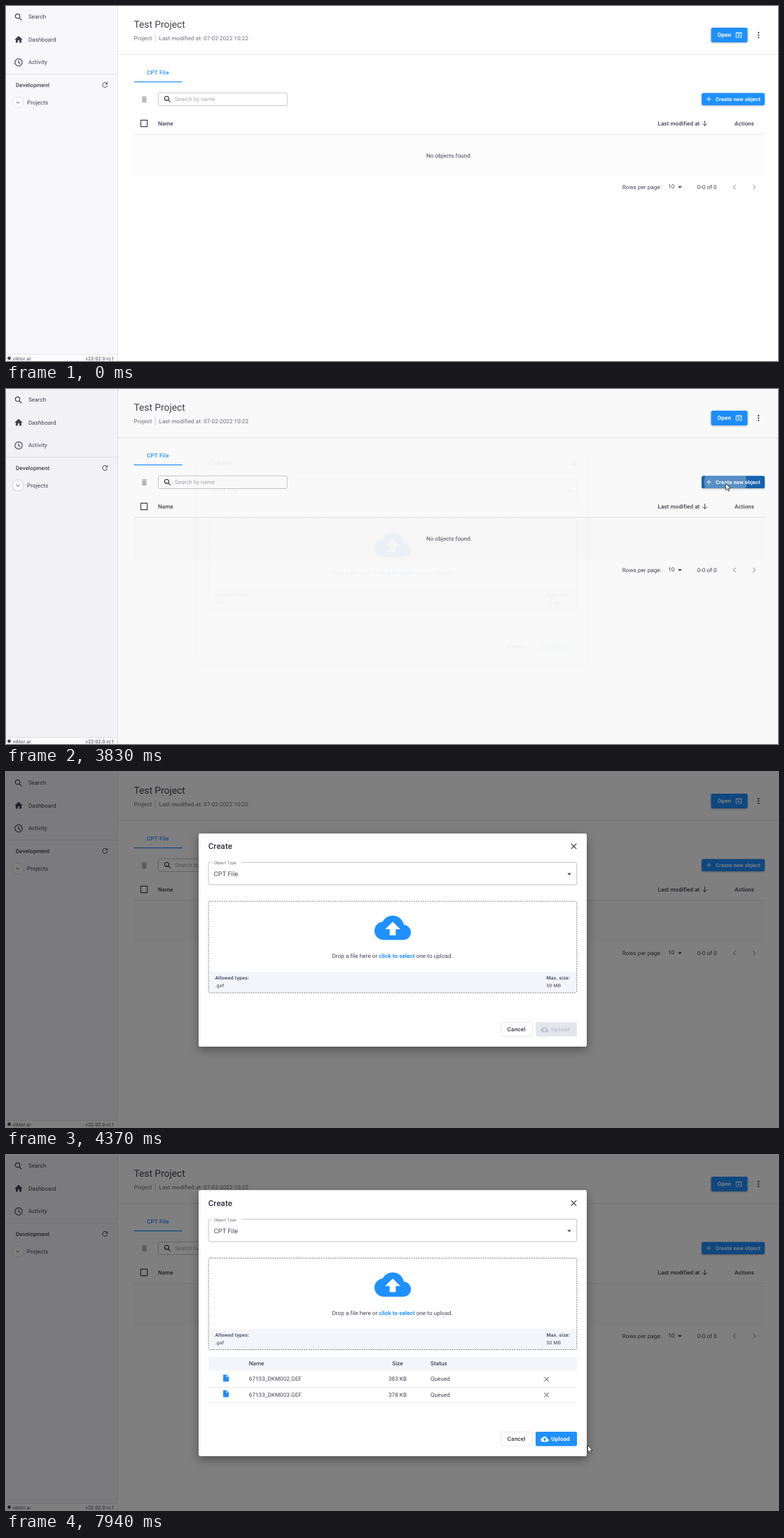
An HTML page that plays this animation: 1102x508 px, repeating every 8 s.

```html
<!DOCTYPE html>
<html lang="en">
<head>
<meta charset="utf-8">
<title>Create object</title>
<style>
html, body { margin: 0; width: 100%; height: 100%; overflow: hidden; background: #fff; }
svg { display: block; width: 100vw; height: 100vh; }
text { font-family: Roboto, Arial, sans-serif; text-rendering: geometricPrecision; white-space: pre; }
#paper { filter: drop-shadow(0 5px 7px rgba(0, 0, 0, .35)); }
.raised { filter: drop-shadow(0 1px 1px rgba(0, 0, 0, .3)); }
</style>
</head>
<body>
<svg id="stage" viewBox="0 0 1102 508"></svg>
<script>
const INK = '#414150', BLUE = '#1e90ff', LINE = '#e0e0e4', PALE = '#f4f5fb';

// ---- drawing helpers ----
const text = (x, y, str, o = {}) => {
  const { size = 8.04, weight = 400, fill = INK, gap = .0107, anchor = 'start', extra = '' } = o;
  return `<text x="${x}" y="${y}" font-size="${size}" font-weight="${weight}" fill="${fill}"
    letter-spacing="${gap * size}" text-anchor="${anchor}" ${extra}>${str}</text>`;
};
const strong = (x, y, str, o) => text(x, y, str, { weight: 500, ...o });
const small = (x, y, str, o) => text(x, y, str, { size: 6.89, gap: .0333, ...o });
const rect = (x, y, w, h, fill, extra = '') =>
  `<rect x="${x}" y="${y}" width="${w}" height="${h}" fill="${fill}" ${extra}/>`;
const box = (x, y, w, h, stroke, extra = '') =>
  rect(x, y, w, h, 'none', `rx="2.3" stroke="${stroke}" stroke-width=".8" ${extra}`);

const solid = {
  home: 'M10 20v-6h4v6h5v-8h3L12 3 2 12h3v8z',
  trash: 'M6 19c0 1.1.9 2 2 2h8c1.1 0 2-.9 2-2V7H6zM19 4h-3.5l-1-1h-5l-1 1H5v2h14z',
  drop: 'M7 10l5 5 5-5z',
  cloud: 'M19.35 10.04C18.67 6.59 15.64 4 12 4 9.11 4 6.6 5.64 5.35 8.04 2.34 8.36 0 10.91 0 14c0 3.31 2.69 6 6 6h13c2.76 0 5-2.24 5-5 0-2.64-2.05-4.78-4.65-4.96zM14 13v4h-4v-4H7l5-5 5 5z',
  file: 'M6 2c-1.1 0-2 .9-2 2v16c0 1.1.9 2 2 2h12c1.1 0 2-.9 2-2V8l-6-6zm7 7V3.5L18.5 9z',
  dots: 'M10 6a2 2 0 1 0 4 0 2 2 0 1 0-4 0M10 12a2 2 0 1 0 4 0 2 2 0 1 0-4 0M10 18a2 2 0 1 0 4 0 2 2 0 1 0-4 0'
};
const lines = {
  search: 'M4 9.5a5.5 5.5 0 1 0 11 0 5.5 5.5 0 1 0-11 0M13.7 13.7l6 6',
  clock: 'M3 12a9 9 0 1 0 18 0 9 9 0 1 0-18 0M12 7v5.4l4 2.4',
  refresh: 'M18 7.5A7.3 7.3 0 1 0 19.2 13.5M19 4v5.5h-5.5',
  right: 'M9 6l6 6-6 6',
  left: 'M15 6l-6 6 6 6',
  expand: 'M6.5 9.5l5.5 5.5 5.5-5.5',
  down: 'M12 4v15M5 12.5l7 7 7-7',
  close: 'M5.5 5.5l13 13M18.5 5.5l-13 13',
  plus: 'M12 5v14M5 12h14',
  check: 'M4 4h16v16H4z',
  open: 'M9 19.5H4V5h16v14.5h-5M4 6.5h16M12 20v-9M8.5 14l3.5-3.5 3.5 3.5'
};
const icon = (name, cx, cy, size = 13.8, color = INK) => {
  const paint = solid[name] ? `fill="${color}"` : `fill="none" stroke="${color}" stroke-width="2"`;
  const k = size / 24;
  return `<path transform="translate(${cx - size / 2} ${cy - size / 2}) scale(${k})" d="${solid[name] || lines[name]}" ${paint}/>`;
};

// ---- page ----
const white = { weight: 700, fill: '#fff', gap: .0286 };
const sidebar = rect(0, 0, 159.5, 508, '#f7f7fc') + rect(0, 498, 159.5, 10, '#fff') +
  rect(159, 0, .8, 508, LINE) + rect(0, 97, 159, .8, LINE) + rect(0, 498, 159, .8, LINE) +
  icon('search', 18, 16) + text(32, 18.4, 'Search') +
  icon('home', 18, 48) + text(32, 50.9, 'Dashboard') +
  icon('clock', 18, 80.8) + text(32, 83.3, 'Activity') +
  strong(14, 115.7, 'Development') + icon('refresh', 141.3, 113, 11.5) +
  '<circle cx="17" cy="138" r="8" fill="#fff" stroke="#d0d0d8" stroke-width=".7"/>' +
  icon('expand', 17, 138, 10.5) + text(30, 140.6, 'Projects') +
  '<circle cx="4.5" cy="504" r="2.4" fill="#41414f"/>' +
  small(9.5, 507, 'viktor.ai', { extra: 'text-decoration="underline"' }) + small(113.6, 507, 'v22.02.0-rc1');

const grey = { fill: '#6c6c79' };
const header = text(182.5, 31.3, 'Test Project', { size: 13.78, gap: 0 }) +
  text(182.5, 48.5, 'Project', grey) + rect(212.8, 40, .7, 12, '#c4c4cc') +
  text(218.5, 48.5, 'Last modified at: 07-02-2022 10:22', grey) +
  rect(160, 69, 942, .8, LINE) +
  rect(1006.5, 31, 52, 21, BLUE, 'rx="2.3" class="raised"') +
  text(1015.5, 44.3, 'Open', white) + icon('open', 1046, 41.5, 11.5, '#fff') + icon('dots', 1074.2, 41.6);

const table = strong(201, 97.6, 'CPT File', { fill: BLUE, gap: .0286 }) + rect(182.5, 108, 69, 1.2, BLUE) +
  icon('trash', 197.4, 133.4, 12.6, '#b9b9bd') + box(217.4, 124.3, 184, 18.2, '#bdbdc2') +
  icon('search', 230.7, 133.5, 13, '#2c2c36') + text(241, 136.3, 'Search by name', { fill: '#a8a8b0', gap: 0 }) +
  icon('check', 197, 168) + strong(217, 170.6, 'Name') +
  strong(930.5, 170.6, 'Last modified at') + icon('down', 997.5, 168, 11.5) + strong(1040, 170.6, 'Actions') +
  rect(182.5, 184, 900.5, 60, '#fcfcfc') + rect(182.5, 183.3, 900.5, .8, LINE) +
  text(632.5, 216.6, 'No objects found.', { anchor: 'middle' }) +
  text(879.7, 261.8, 'Rows per page:') + text(945.2, 261.2, '10') + icon('drop', 962, 259) +
  text(986.8, 261.8, '0-0 of 0') + icon('left', 1040, 259, 12.5, '#a0a0a6') + icon('right', 1068, 259, 12.5, '#a0a0a6');

const create = rect(993, 124.5, 90, 17.5, BLUE, 'rx="2.3" class="raised"') +
  rect(993, 124.5, 90, 17.5, '#1564b2', 'rx="2.3" id="hover"') +
  '<clipPath id="clip">' + rect(993, 124.5, 90, 17.5, '#000', 'rx="2.3"') + '</clipPath>' +
  '<g clip-path="url(#clip)"><circle id="ripple" cx="1027" cy="134" fill="#fff"/></g>' +
  icon('plus', 1003.3, 133.2, 11, '#fff') + text(1013, 136, 'Create new object', { ...white, size: 7.46 });

// ---- dialog ----
const dialogTop = strong(288.8, 110.2, 'Create', { size: 11.48, gap: .0075, fill: '#2f2f3a' }) +
  icon('close', 810.5, 106.3, 13.8, '#33333d') +
  box(289, 129.4, 525.8, 32, '#b5b5ba') + rect(294, 128, 42, 3, '#fff') +
  text(296.7, 132.4, 'Object Type', { size: 6.03, fill: '#6c6c79' }) +
  text(296.8, 149, 'CPT File', { size: 9.18, gap: .0094 }) + icon('drop', 804, 146) +
  rect(289.4, 286, 525, 30, PALE) +
  box(289, 185, 525.8, 131, '#66666e', 'stroke-dasharray="2 1.3"') +
  icon('cloud', 552, 222.9, 52, BLUE) +
  text(551.6, 266.2, `Drop a file here or <tspan font-weight="700" fill="${BLUE}">click to select</tspan> one to upload.`, { anchor: 'middle' }) +
  small(298.5, 297, 'Allowed types:', { weight: 700, fill: '#4d5568' }) + small(298.8, 308.4, '.gef') +
  small(771.5, 297, 'Max. size:', { weight: 700, fill: '#4d5568' }) + small(771.5, 308.4, '50 MB');

const fileRow = (y, name, size) => icon('file', 314, y - 4, 12, BLUE) +
  text(346.8, y, name) + text(559, y, size, { anchor: 'middle' }) + text(606, y, 'Queued') +
  icon('close', 771.6, y - 2.3, 12) + rect(289, y + 8.8, 526, .7, LINE);
const files = rect(289, 288.5, 526, 20, PALE) + strong(346.8, 301, 'Name') +
  strong(559, 301, 'Size', { anchor: 'middle' }) + strong(606, 301, 'Status') +
  fileRow(323.2, '67133_DKM002.GEF', '383 KB') + fileRow(345.6, '67133_DKM003.GEF', '378 KB');

const upload = (bg, fg) => rect(756, 358, 59, 20.6, bg, 'rx="2.3"') +
  icon('cloud', 769, 368.6, 11.5, fg) + text(778.3, 371, 'Upload', { ...white, fill: fg });
const dialogFoot = box(706.8, 358.3, 44.6, 20, '#e4e4ea') +
  strong(715.6, 371, 'Cancel', { gap: .0286, fill: '#33333d' }) +
  upload('#e4e6ed', '#c2c6d2') + `<g id="ready">${upload(BLUE, '#fff')}</g>`;

const cursor = `<circle id="halo" cx="-.8" cy="0" r="7" fill="#c4b93c"/>
  <g fill="#fff" stroke="#1c1c24" stroke-width=".8" stroke-linejoin="round">
  <path id="arrow" d="M.4.4V10.2L2.6 8.2 4.1 11.6 5.7 10.9 4.2 7.6H7.1Z"/>
  <path id="hand" d="M-.9.9a.9.9 0 0 1 1.8 0V4.5l3.6.9c.7.2 1 .7.9 1.4l-.6 3.9c-.1.6-.4.9-1 .9H-.2c-.5 0-.8-.2-1.1-.6L-4.2 7.6c-.6-1 .3-1.8 1.3-1.2l2 1.2Z"/></g>`;

stage.innerHTML = rect(0, 0, 1102, 508, '#fff') + sidebar + header + table + create +
  rect(0, 0, 1102, 508, '#000', 'id="shade"') +
  `<g id="dialog">${rect(275, 88, 554, 305, '#fff', 'rx="2.3" id="paper"')}
  <g id="top">${dialogTop}</g><g id="files">${files}</g><g id="foot">${dialogFoot}</g></g>
  <g id="pointer">${cursor}</g>`;
const el = {};
stage.querySelectorAll('[id]').forEach(n => el[n.id] = n);
const set = (id, attrs) => { for (const k in attrs) el[id].setAttribute(k, attrs[k]); };
const show = (id, on) => set(id, { visibility: on ? 'visible' : 'hidden' });

// ---- timing ----
// Bursts of movement: start, end, number of pictures. The screen rests in between.
const bursts = [[850, 1570, 12], [1660, 1660, 1], [1960, 2700, 12], [3050, 3050, 1],
  [3630, 4370, 12], [6050, 6840, 13], [6910, 7120, 4], [7380, 7940, 9]];
const snap = t => {
  const b = bursts.findLast(b => t >= b[0]);
  if (!b) return 0;
  const [start, end, n] = b, step = (end - start) / (n - 1) || 1;
  return Math.min(end, start + Math.floor((t - start + 4) / step) * step);
};

// cubic-bezier(.4, 0, .2, 1)
const ease = p => {
  let lo = 0, hi = 1;
  for (let i = 0; i < 20; i++) {
    const u = (lo + hi) / 2, v = 1 - u;
    if (1.2 * v * v * u + .6 * v * u * u + u ** 3 < p) lo = u; else hi = u;
  }
  return lo * lo * (3 - 2 * lo);
};
const ramp = (t, start, length) => ease(Math.max(0, Math.min(1, (t - start) / length)));

// Pointer path: time, x, y
const path = [[850, 1091, 496], [1210, 1000, 370], [1570, 879, 251], [1660, 794, 255], [1893, 794, 255],
  [2160, 902, 188], [2300, 972, 154], [2500, 1027, 134.5], [4370, 1027, 134.5],
  [6050, 106.8, 246], [6220, 190, 247], [6500, 430, 250], [6700, 521, 251.5], [7310, 521, 251.5],
  [7480, 640, 315], [7660, 880, 430], [7740, 936, 450], [7820, 905, 441], [7940, 830, 415]];
const locate = t => {
  const i = Math.max(1, path.findIndex(k => k[0] >= t));
  const [a, b] = [path[i - 1], path[i]], p = (t - a[0]) / (b[0] - a[0]);
  return [a[1] + (b[1] - a[1]) * p, a[2] + (b[2] - a[2]) * p];
};

function draw(now) {
  const t = snap(now % 8000);
  const fade = ramp(t, 3803, 225), grown = t > 6835;

  set('hover', { opacity: ramp(t, 2430, 250) - ramp(t, 3830, 250) });
  set('ripple', { r: 56 * ramp(t, 3630, 550), opacity: .3 * (1 - ramp(t, 3800, 550)) });
  set('shade', { opacity: .5 * fade });
  set('dialog', { opacity: fade });
  set('paper', grown ? { y: 50.3, height: 380.6 } : { y: 88, height: 305 });
  set('top', { transform: `translate(0 ${grown ? -37.5 : 0})` });
  set('foot', { transform: `translate(0 ${grown ? 38 : 0})` });
  show('files', grown);
  set('ready', { opacity: ramp(t, 6850, 260) });

  const away = t < 850 || t >= 4365 && t < 6050;
  const hand = t > 2430 && t < 3050 || t > 6700 && t < 6910;
  show('hand', hand && !away);
  show('arrow', !hand && !away);
  show('halo', t >= 6050 && t < 6700);
  if (!away) set('pointer', { transform: `translate(${locate(t)})` });
}

const begin = performance.now();
const frame = () => { draw(performance.now() - begin); requestAnimationFrame(frame); };
frame();
</script>
</body>
</html>
```
